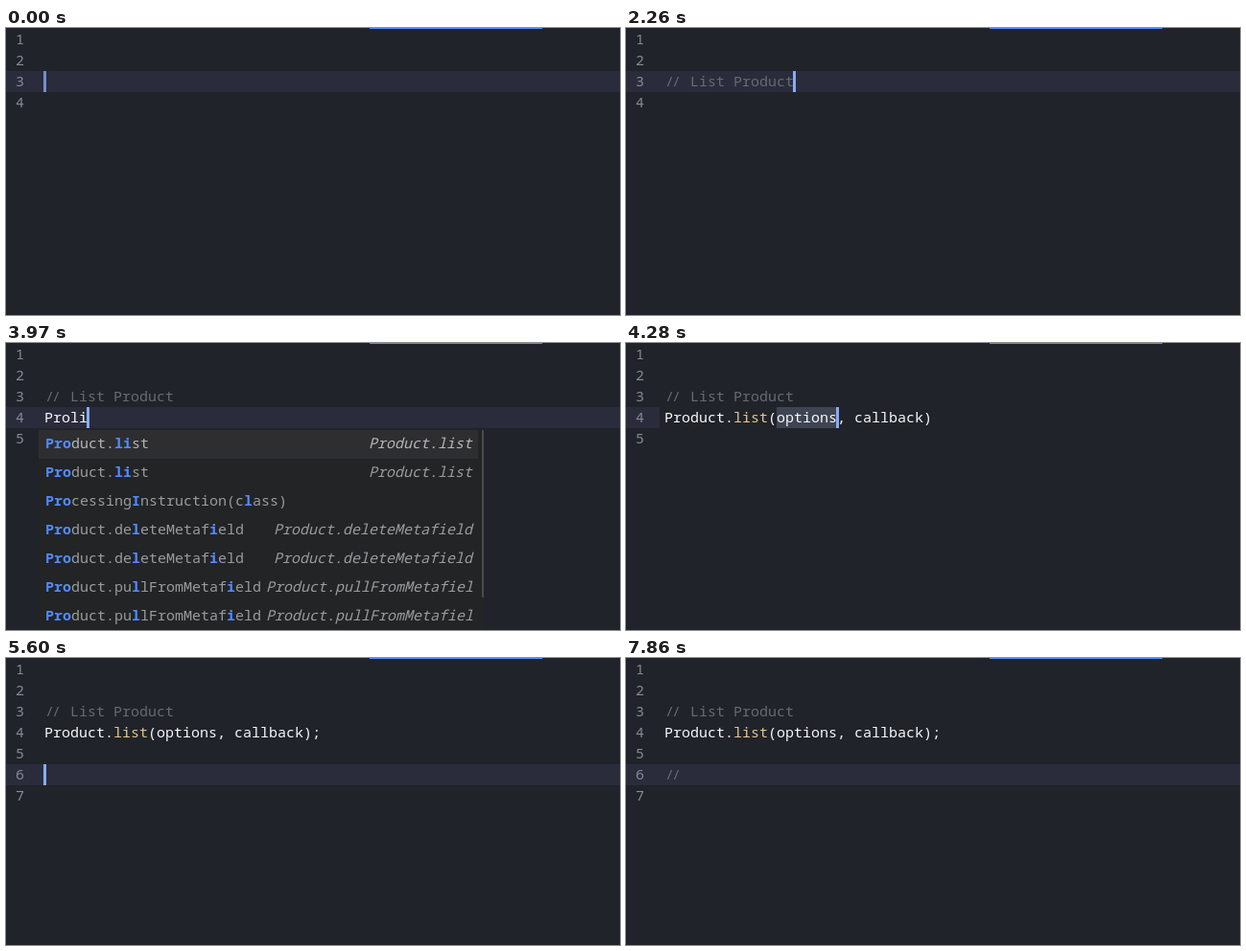
An HTML page for the animation above (8 s loop, 640 px wide and 300 px high).

```html
<!DOCTYPE html>
<html lang="en">
<head>
<meta charset="utf-8">
<title>Editor typing</title>
<style>
  html, body { margin: 0; width: 100%; height: 100%; overflow: hidden; background: #20232a; }
  svg { display: block; width: 640px; height: 300px; }
  text { font: 15px "Noto Sans Mono", "DejaVu Sans Mono", monospace; white-space: pre; }
  .hit { font-weight: 700; fill: #528bff; }
  .note { font-style: italic; }
</style>
</head>
<body>
<svg id="stage" viewBox="0 0 640 300"></svg>
<script>
const LOOP = 8000, CHAR = 9, LINE = 22, LEFT = 40;
const stage = document.getElementById('stage');

const COMMENT = '// List Product';
const CALL = 'Product.list(options, callback)';

// Every state: time, editor lines, cursor row (1-based) and column
const states = [];
function state(at, lines, row, col, extra = {}) {
  states.push({ at, lines, row, col, ...extra });
}
function type(text, times, before, after, row, extra = () => ({})) {
  times.forEach((at, i) => {
    const typed = text.slice(0, i + 1);
    state(at, [...before, typed, ...after], row, i + 1, extra(typed));
  });
}

state(-410, ['', '', '', ''], 3, 0);
type(COMMENT,
  [760, 920, 980, 1150, 1230, 1320, 1400, 1480, 1620, 1700, 1790, 1870, 2010, 2090, 2260],
  ['', ''], [''], 3);
const head = ['', '', COMMENT];
state(2640, [...head, '', ''], 4, 0);
type('Prolist', [3500, 3640, 3720, 3890, 3970, 4030, 4110], head, [''], 4, query => ({ query }));
state(4280, [...head, CALL, ''], 4, 20, { select: [13, 20], gutter: true });
state(4600, [...head, CALL, ''], 4, 30, { select: [22, 30] });
state(4740, [...head, CALL, ''], 4, 31);
const done = [...head, CALL + ';', ''];
state(5060, done, 4, 32);
state(5360, [...done, ''], 5, 0);
state(5600, [...done, '', ''], 6, 0);
type('// ', [5990, 6150, 7160], done, [''], 6);

// Completions; brackets mark the letters matched after the "Pro" prefix
const short = ['Product', 'Promise(class)', 'Proxy(class)', 'ProgressEvent(class)',
  'ProcessingInstruction(class)', 'PromiseRejectionEvent', 'ProgressEvent'];
const long = [
  'Product.[l][i]st', 'Product.[l][i]st', 'Processing[I]nstruction(c[l]ass)',
  'Product.de[l]eteMetaf[i]eld', 'Product.de[l]eteMetaf[i]eld',
  'Product.pu[l]lFromMetaf[i]eld', 'Product.pu[l]lFromMetaf[i]eld'];

const rect = (x, y, w, h, fill, more = '') =>
  `<rect x="${x}" y="${y}" width="${w}" height="${h}" fill="${fill}" ${more}/>`;
const text = (x, y, body, fill, more = '') =>
  `<text x="${x}" y="${y}" fill="${fill}" ${more}>${body}</text>`;
const hit = s => `<tspan class="hit">${s}</tspan>`;
const rowTop = row => 1 + LINE * (row - 1);

function popup(query) {
  const n = query.length, wide = n > 3;
  const items = !wide ? short : n < 6 ? long : ['Product.[lis]t', 'Product.[lis]t'];
  const finished = n > 6;
  const right = wide ? 498 : 330;
  let out = rect(34, 90, right - 34, items.length > 2 ? 210 : 62, '#222426') +
    rect(34, 91, right - 40, 30, '#2e2e31');
  items.forEach((item, i) => {
    const y = 110 + 30 * i;
    const marked = finished ? item.replace('[lis]t', '[list]') : item;
    const pre = Math.min(n, 3);
    const body = hit(marked.slice(0, pre)) +
      marked.slice(pre).replace(/\[(\w+)\]/g, (_, s) => hit(s));
    const ink = i ? '#9a9b9c' : '#b4b5b6';
    out += text(41, y, body, ink);
    const plain = item.replace(/[[\]]/g, '');
    if (plain.includes('.')) {
      const label = plain.slice(0, 24);
      out += text(486 - CHAR * label.length + (label.length > 23 ? 1 : 0), y, label, ink, 'class="note"');
    }
  });
  if (items.length > 2) out += rect(right - 2, 91, 2, 175, '#4b4b4d');
  return out;
}

function codeLine(line, row) {
  const y = rowTop(row) + 16;
  if (line.startsWith('/')) {
    // the double slash sits tight, like a ligature
    const slashes = line[1] === '/' ? text('41 48', y, '//', '#676a70') : text(LEFT, y, '/', '#676a70');
    return slashes + text(LEFT + 2 * CHAR, y, line.slice(2), '#676a70');
  }
  const body = line.replace('list(', '<tspan fill="#e6c48c">list</tspan>(');
  return line ? text(LEFT, y, body, '#f6f7f9') : '';
}

const clamp = v => Math.max(0, Math.min(1, v));
const ease = v => { const k = 1 - clamp(v); return 1 - k * k * (1 + 0.6 * clamp(v)); };

// Cursor stays solid after a key, then fades out and in again
function blink(idle) {
  const d = (idle - 360) % 900;
  if (d < 0) return 1;
  return d < 450 ? 1 - ease(d / 330) : ease((d - 450) / 330);
}

function scene(t) {
  const s = states.filter(v => v.at <= t).pop();
  const top = rowTop(s.row);
  let out = rect(0, 0, 640, 300, '#20232a') + rect(379, 0, 180, 1, '#528bff');
  if (!s.select) out += rect(0, top, 640, LINE, '#2a2c3b');
  else {
    const [from, to] = s.select;
    if (s.gutter) out += rect(0, top, 35, LINE, '#2a2c3b');
    out += rect(LEFT + from * CHAR, top, (to - from) * CHAR, LINE, '#3e4451');
  }
  s.lines.forEach((line, i) => {
    out += text(10, rowTop(i + 1) + 16, i + 1, '#858a93') + codeLine(line, i + 1);
  });
  out += rect(39 + s.col * CHAR, top, 3, LINE, '#88abf5', `opacity="${blink(t - s.at).toFixed(3)}"`);
  return s.query ? out + popup(s.query) : out;
}

let shown = '';
function frame() {
  const next = scene(performance.now() % LOOP);
  if (next !== shown) stage.innerHTML = shown = next;
  requestAnimationFrame(frame);
}
frame();
</script>
</body>
</html>
```
